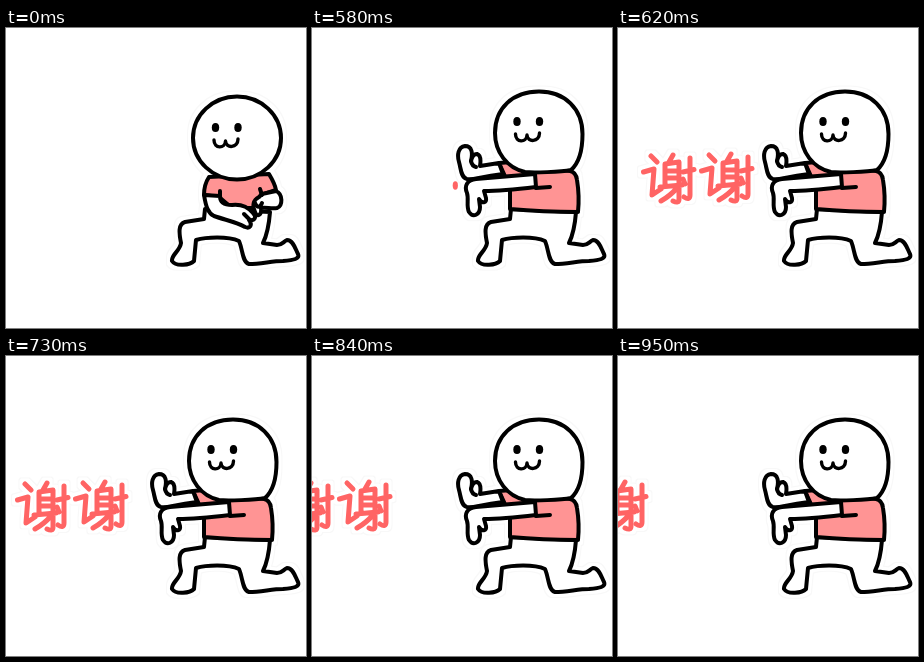
An HTML page without scripts that plays this animation: 300x300 px, repeating every 1.06 s.

```html
<!DOCTYPE html>
<html lang="zh">
<head>
<meta charset="utf-8">
<title>谢谢</title>
<style>
html, body { margin: 0; width: 100%; height: 100%; overflow: hidden; background: #fff; }
svg { display: block; width: 100vw; height: 100vh; }
.ink { fill: none; stroke: #000; stroke-width: 4; stroke-linecap: round; stroke-linejoin: round; }
.skin { fill: #fff; }
.shirt { fill: #ff9494; }
.dot { fill: #000; stroke: none; }
.word { fill: none; stroke: #ff6464; stroke-width: 5; stroke-linecap: round; stroke-linejoin: round; }
.crouch, .push, .spark, .word { animation: 1060ms step-end infinite; }
.crouch { animation-name: crouch; }
.push { animation-name: push; }
.spark { fill: #ff6464; animation-name: spark; }
.word { animation-name: fly; }
@keyframes crouch { 0% { opacity: 1 } 54.71%, 100% { opacity: 0 } }
@keyframes push { 0% { opacity: 0 } 54.71%, 100% { opacity: 1 } }
@keyframes spark { 0% { opacity: 0 } 54.71% { opacity: 1 } 58.49%, 100% { opacity: 0 } }
@keyframes fly {
  0% { opacity: 0; transform: none }
  58.49% { opacity: 1; transform: none }
  68.86% { opacity: 1; transform: translate(-14px, 0) }
  79.24% { opacity: 1; transform: translate(-56px, 0) }
  89.62%, 100% { opacity: 1; transform: translate(-106px, 0) }
}
</style>
</head>
<body>
<svg viewBox="0 0 300 300">
  <defs>
    <!-- faint sticker edge -->
    <filter id="edge" filterUnits="userSpaceOnUse" x="-120" y="0" width="540" height="300" color-interpolation-filters="sRGB">
      <feMorphology in="SourceAlpha" operator="dilate" radius="4" result="wide"/>
      <feMorphology in="SourceAlpha" operator="dilate" radius="3" result="slim"/>
      <feFlood flood-color="#f8f8f8"/>
      <feComposite in2="wide" operator="in" result="rim"/>
      <feFlood flood-color="#fff"/>
      <feComposite in2="slim" operator="in" result="pad"/>
      <feMerge>
        <feMergeNode in="rim"/><feMergeNode in="pad"/><feMergeNode in="SourceGraphic"/>
      </feMerge>
    </filter>
    <g id="face">
      <ellipse class="dot" cx="-21.500" cy="-10.500" rx="3.700" ry="4.500"/>
      <ellipse class="dot" cx="1" cy="-10.500" rx="3.700" ry="4.500"/>
      <path stroke-width="3.400" d="M-23 2C-23 11-12 11-11.500 3C-11 11 1 10 1 1"/>
    </g>
    <path id="legs" class="skin" d="M199 181L198 191L179 194C172 196 173 205 175 215C174 223 165 227 166 233C170 239 184 237 188 233L190 212C200 209 222 208 233 213C237 222 236 234 243 236C255 236 266 233 277 233C288 232 294 231 292 226C289 220 287 212 281 212C277 214 276 217 271 217L257 215C261 207 263 197 264 184Z"/>
    <g id="xie">
      <path d="M33 128L39 134M25.500 144L36 141L34 167L43 161"/>
      <path d="M55 127L51 134M47 158V136L61 134V171Q61 176 55 173M48 143H61M48 150H61M42 159L64 157M59 160Q52 168 43 173"/>
      <path d="M65 144L76 141.500M72 130V167Q72 173 66 169M65 151L67 156"/>
    </g>
  </defs>

  <g class="crouch" filter="url(#edge)">
    <g class="ink">
      <use href="#legs"/>
      <path class="shirt" d="M203 149C199 155 198 161 198 167L213 169L226 180L251 180L255 167L270 162C269 156 266 151 263 146Z"/>
      <path class="skin" d="M198 167C200 179 202 185 208 188C219 192 231 194 239 199C244 201 247 197 243 192C249 193 251 189 247 185C242 179 235 176 226 177C217 177 214 174 214 168Z"/>
      <path class="skin" d="M270 163C277 166 277 178 271 180C265 181 260 179 255 180C256 187 251 190 249 184C246 178 247 172 253 169L256 166Z"/>
      <path d="M214 163V168M254 161L256 167M238 186L244 192M249 175C251 180 254 180 256 175"/>
      <ellipse class="skin" cx="231" cy="110" rx="44" ry="41.500"/>
      <use href="#face" x="231" y="110"/>
    </g>
  </g>

  <g class="push" filter="url(#edge)">
    <g class="ink">
      <use href="#legs"/>
      <path class="shirt" d="M187 135L200 134L258 143Q264 144 265 152C267 164 267 174 266 184Q231 184 198 181L198 163L192 146Z"/>
      <path class="skin" d="M187 135L168 138C169 132 168 127 165 126C161 126 160 129 159 133C161 125 160 118 153 118C146 119 145 127 147 134C149 141 149 150 155 151C162 152 166 149 191 146Z"/>
      <path d="M159 133Q160 138 164 139"/>
      <path class="skin" d="M223 146L164 151C155 152 152 158 155 165C157 171 154 178 157 184C161 190 168 187 168 179L167 171C170 176 175 175 174 170L172 163C190 163 207 161 224 159Z"/>
      <path d="M224 160L238 159"/>
      <path class="skin" d="M183 105C183 80 201 63.500 227 63.500C253 63.500 270.500 81 270.500 106C270.500 122 267 135 259 142C249 144 221 145 213 144C195 140 183 124 183 105Z"/>
      <use href="#face" x="226.500" y="104"/>
    </g>
  </g>

  <ellipse class="spark" cx="143.300" cy="157.500" rx="2.600" ry="4.200"/>

  <g class="word" filter="url(#edge)" role="img" aria-label="谢谢">
    <use href="#xie"/>
    <use href="#xie" x="58" y="-1"/>
  </g>
</svg>
</body>
</html>
```
